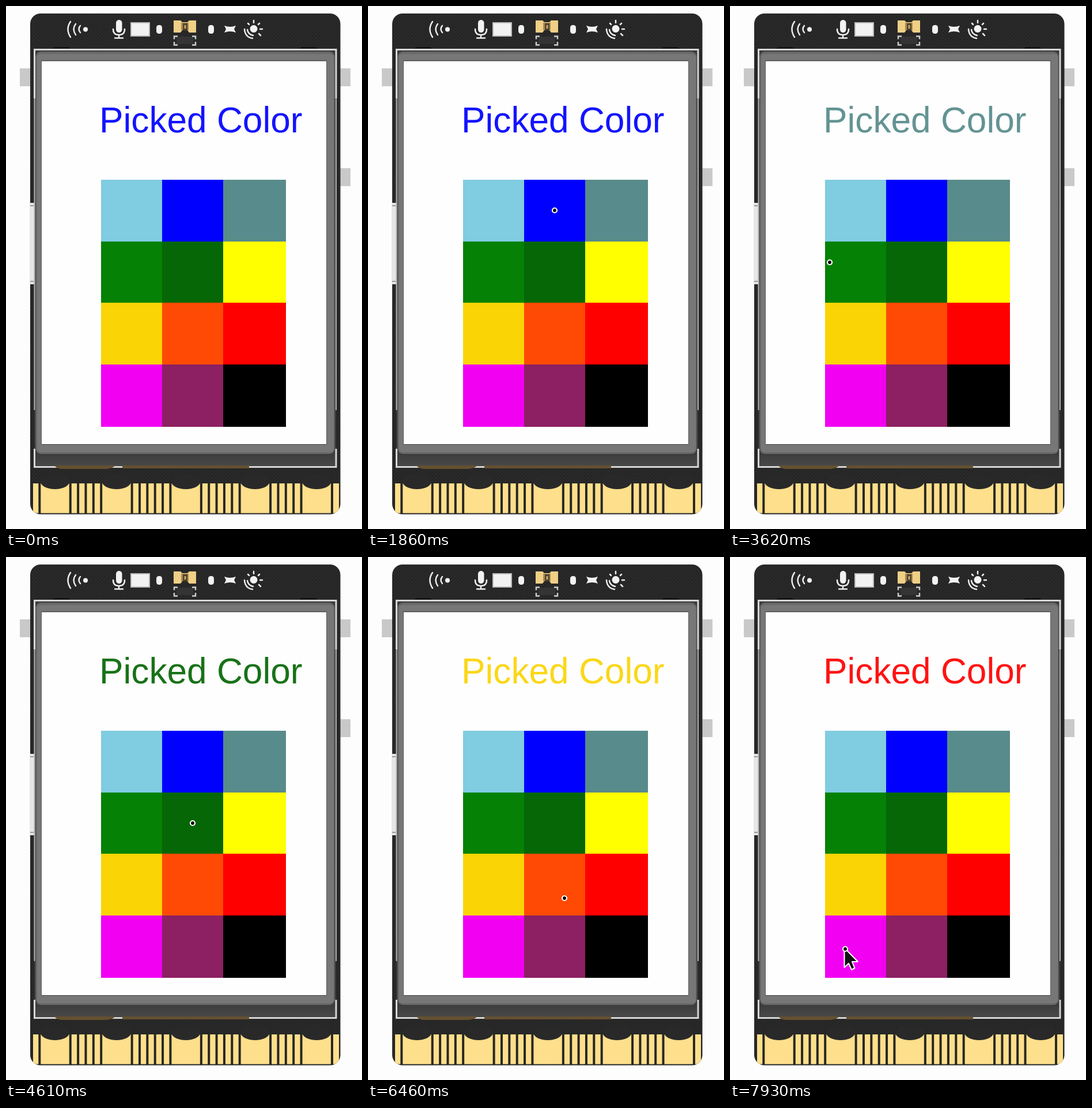
These frames come from a looping animation (618x906 px, 8 s). An HTML page:

```html
<!DOCTYPE html>
<html lang="en">
<head>
<meta charset="utf-8">
<title>Picked Color</title>
<style>
  html, body { margin: 0; width: 100%; height: 100%; overflow: hidden; background: #fdfdfd; }
  svg { display: block; width: 100%; height: 100%; }
  text { font: 62.2px "Liberation Sans", Arial, sans-serif; }
</style>
</head>
<body>
<svg viewBox="0 0 618 906">
  <defs>
    <linearGradient id="lip" x2="0" y2="1">
      <stop offset="0" stop-color="#383838"/><stop offset="1" stop-color="#484848"/>
    </linearGradient>
    <pattern id="weave" width="6" height="6" patternUnits="userSpaceOnUse">
      <rect width="6" height="6" fill="#292929"/>
      <path d="M0 0h2v2H0zM3 3h2v2H3z" fill="#222"/>
    </pattern>
    <clipPath id="body"><rect x="42" y="13" width="538.5" height="867.5" rx="18"/></clipPath>
  </defs>
  <rect width="618" height="906" fill="#fdfdfd"/>

  <path d="M24 108h20v31H24zM578 108h20v31h-20zM578 281h20v31h-20z" fill="#c9c9c9"/>

  <g clip-path="url(#body)">
    <rect x="42" y="13" width="539" height="868" fill="url(#weave)"/>
    <g id="pads"></g>
  </g>
  <rect x="41" y="341" width="8" height="141" fill="#e6e6e6"/>
  <path d="M42 346h6M42 477h6" stroke="#999" stroke-width="2"/>

  <!-- display module -->
  <rect x="49" y="75" width="524" height="724" fill="#3c3c3c"/>
  <g fill="none" stroke="#d6d6d6" stroke-width="3">
    <path d="M49.5 160V75.500H573V160M49.500 767V798.500H573V767"/>
    <path d="M49.5 160V700M573 160V700" stroke="#b4b4b4" stroke-width="2"/>
  </g>
  <path d="M80 74l4-3h24l4 3zM509 74l4-3h24l4 3z" fill="#151515"/>
  <rect x="52" y="768" width="519" height="28" fill="url(#lip)"/>
  <path d="M84 796h106q-6 6-20 6H100q-12 0-16-6zM202 796h220v5H202z" fill="#65502f"/>
  <rect x="51.500" y="79" width="519" height="697" rx="9" fill="#686868"/>
  <rect x="54" y="83" width="515" height="690" rx="6" fill="#777"/>
  <rect x="61.500" y="94" width="495" height="666" fill="#444"/>
  <rect x="62" y="95.500" width="494" height="663.500" fill="#fefefe"/>

  <!-- top row of parts -->
  <g fill="none" stroke="#eee" stroke-width="2.500" stroke-linecap="round">
    <path d="M112 27q-9 13 0 27M121 31q-7 9 0 19M129 34q-5 6 0 12"/>
    <path d="M186 40q0 10 10 10t10-10M196 50v5M189 55.500h14"/>
    <path d="M414 40q1 14 14 16M419 41q1 8 10 10"/>
    <path d="M430 25v4M440 30l-2 2M420 30l2 2M441 40h4M439 48l3 3"/>
  </g>
  <g fill="#f2f2f2">
    <circle cx="138" cy="40.500" r="4"/>
    <rect x="191" y="24" width="10.500" height="22" rx="5.200"/>
    <rect x="217" y="29" width="32" height="23" stroke="#bbb" stroke-width="2"/>
    <rect x="261" y="33" width="10" height="15" rx="4.500"/>
    <rect x="351" y="33" width="10" height="15" rx="4.500"/>
    <path d="M379 34q10 4 20 0l-3 6 3 6q-10-4-20 0l3-6z"/>
    <circle cx="430" cy="39.500" r="6.500"/>
  </g>
  <path d="M291 25h12l3 3h9l3-3h12v21h-12l-3-4h-9l-3 4h-12z" fill="#f0cf87"/>
  <rect x="304" y="29" width="13" height="13" fill="#a98a50"/>
  <rect x="307" y="30" width="8" height="12" fill="#51432e"/>
  <rect x="309.500" y="33" width="3" height="6" fill="#c6a562"/>
  <rect x="296" y="53" width="29" height="13" fill="#343434"/>
  <path d="M298 52.500h-6v5M292 62v5.500h6M323 52.500h6v5M329 62v5.500h-6" fill="none" stroke="#ccc" stroke-width="2.500"/>

  <text id="label" x="162" y="219" opacity=".92">Picked Color</text>
  <g id="tiles"></g>

  <g id="cursor">
    <path id="arrow" d="M-1.500-2V32L6 25l5 11 5.500-3L12 22h10z" fill="#111" stroke="#fff" stroke-width="2" stroke-linejoin="round"/>
    <circle r="4" stroke="#fff" stroke-width="2.200"/>
  </g>
</svg>
<script>
const LOOP = 8000;
const SVG = "http://www.w3.org/2000/svg";
const byId = id => document.getElementById(id);

function add(parent, tag, attrs) {
  const el = document.createElementNS(SVG, tag);
  for (const key in attrs) el.setAttribute(key, attrs[key]);
  return parent.appendChild(el);
}

// Edge connector: gaps on an even pitch, left out around each wide notched pad
const pads = byId("pads");
const padX = k => 58.3 + 13.36 * k;
const wide = [2, 10, 19, 28, 36];
add(pads, "rect", { x: 47, y: 827, width: 531, height: 51.5, fill: "#fddf8c" });
for (let k = 0; k <= 38; k++) {
  if (wide.some(c => Math.abs(k - c) < 2)) continue;
  add(pads, "rect", { x: padX(k) - 2, y: 826, width: 4, height: 54, fill: "#292722" });
}
for (const k of wide)
  add(pads, "ellipse", { cx: padX(k), cy: 824, rx: 25, ry: 13, fill: "#292929" });

// Palette: each tile overlaps the one before it
const colors = ["#80cce0", "#0000ff", "#588b8b", "#058205", "#056705", "#ffff00",
                "#fbd405", "#ff4a05", "#ff0000", "#f200f2", "#8c2062", "#000000"];
const tileX = i => 165 + 106 * (i % 3);
const tileY = i => Math.round(301 + 106.7 * Math.floor(i / 3));
colors.forEach((fill, i) =>
  add(byId("tiles"), "rect", { x: tileX(i), y: tileY(i), width: 109, height: 108, fill }));

// Tiles are clicked in order, a little faster each time
const clickTime = i => 850 + 1020 * i - 21 * i * i;
const HOLD = 50;

// Points passed between the clicks: time, x, y
const stops = [[450, 165, 354], [1040, 246, 365], [2550, 404, 381], [3620, 173, 444],
               [5550, 387, 534], [6460, 341, 591], [7930, 200, 679], [LOOP, 200, 679]];
for (let i = 0; clickTime(i) < LOOP; i++) {
  for (const side of [-HOLD, HOLD])
    stops.push([clickTime(i) + side, tileX(i) + 53, tileY(i) + 53]);
}
stops.sort((a, b) => a[0] - b[0]);

function pointerAt(t) {
  const i = stops.findIndex(s => s[0] > t);
  if (i < 1) return null;
  const [t0, x0, y0] = stops[i - 1], [t1, x1, y1] = stops[i];
  const u = (t - t0) / (t1 - t0);
  const k = u * u * (3 - 2 * u);
  return [x0 + (x1 - x0) * k, y0 + (y1 - y0) * k];
}

function pickedAt(t) {
  let picked = 1;
  for (let i = 0; clickTime(i) <= t; i++) picked = i;
  return picked;
}

const label = byId("label"), cursor = byId("cursor"), arrow = byId("arrow");

function draw(t) {
  label.setAttribute("fill", colors[pickedAt(t)]);
  const pos = pointerAt(t);
  cursor.setAttribute("visibility", pos ? "visible" : "hidden");
  if (pos) cursor.setAttribute("transform", `translate(${pos[0]} ${pos[1]})`);
  arrow.setAttribute("display", t >= 7900 ? "inline" : "none");
}

const start = performance.now();
function tick(now) {
  draw(Math.max(0, now - start) % LOOP);
  requestAnimationFrame(tick);
}
draw(0);
requestAnimationFrame(tick);
</script>
</body>
</html>
```
